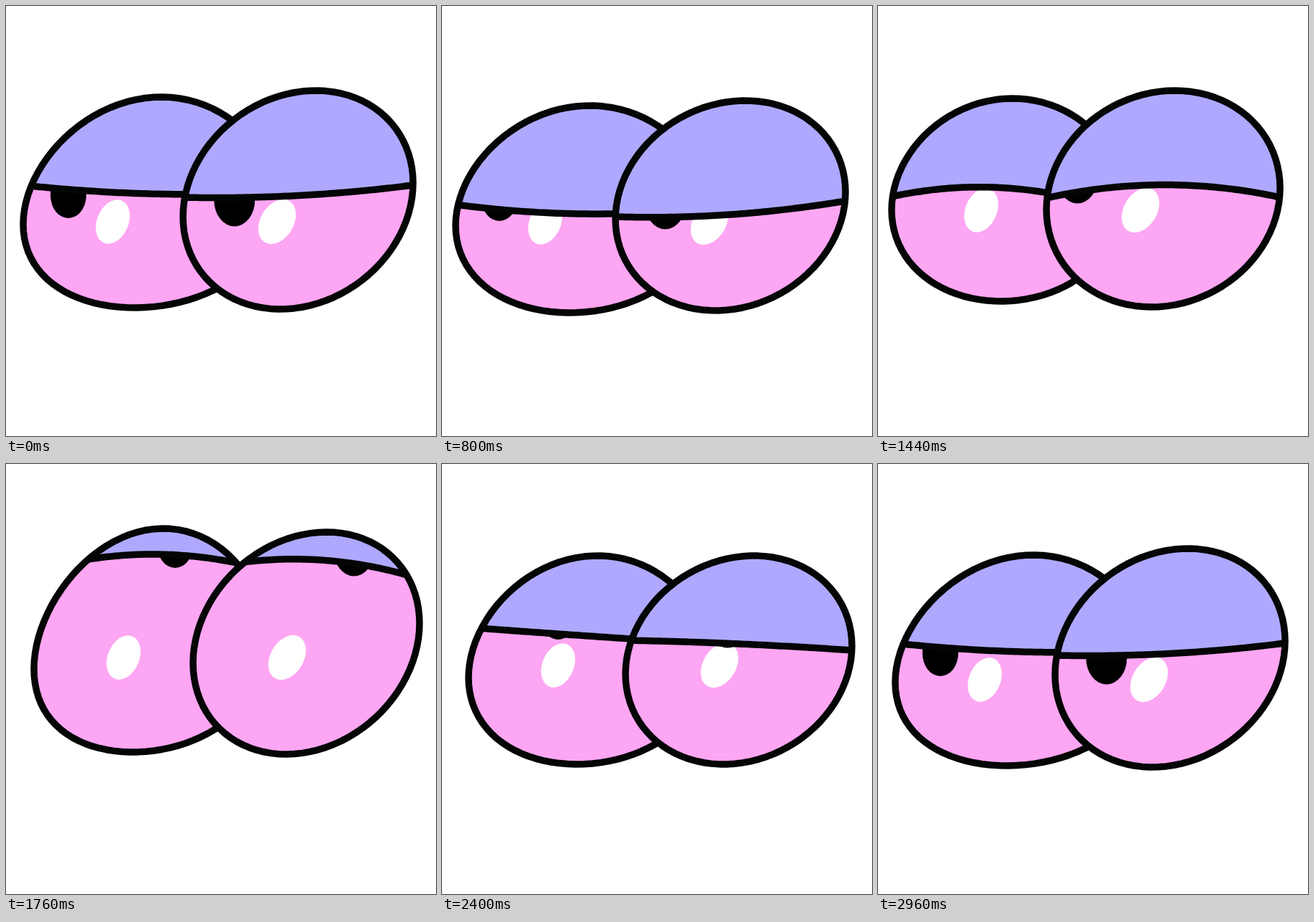
An HTML page with a canvas that plays this animation: 600 by 600 pixels, repeating every 3120 ms.

```html
<!DOCTYPE html>
<html lang="en">
<head>
<meta charset="utf-8">
<title>Sleepy eyes</title>
<style>
  html, body { margin: 0; width: 100%; height: 100%; overflow: hidden; background: #fff; }
  canvas { display: block; width: 100vw; height: 100vh; }
</style>
</head>
<body>
<canvas id="stage" width="600" height="600"></canvas>
<script>
const ctx = document.getElementById('stage').getContext('2d');
const INK = '#040505', LID = '#aea9ff', EYE = '#fda6f3';
const LOOP = 3120, STEP = 80;

// How the two eyes differ; span is the part of the lid line drawn when shut
const sides = [
  { tilt: 0, taper: 1, pupil: 1, shine: 1, drop: 0, turn: 0.4, span: [0.08, 1.05] },
  { tilt: 0.05, taper: 0, pupil: 1.14, shine: 1.05, drop: 7, turn: 0.54, span: [-0.18, 0.89] }
];

// pupil: x from the eye's left edge, y; shine: y;
// box: left, top, right, bottom; lid: y at left edge, middle and right edge
const pose = (lean, pupil, shine, box, lid, box2, lid2) =>
  [{ lean: [lean], pupil, shine: [shine], box, lid },
   { lean: [lean], pupil, shine: [shine], box: box2, lid: lid2 }];

const rest = pose(0.105, [63, 264], 301,
  [24, 127, 376, 421], [250, 262, 260], [247, 118, 568, 423], [267, 264.5, 250]);
const drowsy = pose(0.08, [61, 268], 302,
  [19, 139, 368, 428], [277, 290, 282], [242, 132, 563, 425], [294, 291, 272]);
const shut = pose(0.04, [52, 295], 305,
  [13, 168, 349, 418], [367, 382.5, 361], [227, 160, 565, 424], [374, 387, 357]);
const waking = pose(0.05, [38, 232], 285,
  [19, 129, 341, 412], [266, 254, 288], [235, 118, 561, 420], [268, 249.5, 267]);
const wide = pose(0.13, [197, 113], 270,
  [39, 90, 363, 402], [150, 126, 148], [261, 95, 577, 405], [150, 133, 160]);
const sinking = pose(0.085, [125, 213], 281,
  [37, 128, 371, 419], [228, 240, 251], [256, 128, 572, 419], [246, 251, 260]);

// time, pose, ease-out power of the way in
const keys = [
  [0, rest, 1], [800, drowsy, 1.3], [1200, shut, 1], [1440, waking, 1],
  [1760, wide, 1.5], [1840, wide, 1], [2400, sinking, 1], [2960, rest, 2], [LOOP, rest, 1]
];
// slots where the previous drawing is held
const held = [160, 400, 640, 880, 1280, 2000, 3040];

const mix = (a, b, u) => a.map((v, i) => v + (b[i] - v) * u);
const mixEye = (a, b, u) =>
  Object.fromEntries(Object.keys(a).map(k => [k, mix(a[k], b[k], u)]));

function trace(point, from, to, path = new Path2D()) {
  for (let i = 0; i <= 90; i++) path.lineTo(...point(from + (to - from) * i / 90));
  return path;
}

function oval(x, y, rx, ry, turn, color) {
  ctx.fillStyle = color;
  ctx.beginPath();
  ctx.ellipse(x, y, rx, ry, turn, 0, 2 * Math.PI);
  ctx.fill();
}

function drawEye(e, side, closed) {
  const [left, top, right, bottom] = e.box;
  const w = (right - left) / 2, h = (bottom - top) / 2;

  // Leaning ellipse; a tapered one leans only towards its left end
  const rim = a => {
    const lean = (e.lean[0] + side.tilt) * (1 - side.taper * Math.cos(a));
    return [left + w + w * Math.cos(a), top + h + h * Math.sin(a - lean)];
  };
  const shell = trace(rim, 0, 2 * Math.PI);
  shell.closePath();

  // Parabola through the three lid heights
  const [y0, y1, y2] = e.lid;
  const lidAt = t => [
    left + 2 * w * t,
    y0 + (y2 - y0) * t + (y1 - (y0 + y2) / 2) * 4 * t * (1 - t)
  ];

  ctx.fillStyle = closed ? LID : EYE;
  ctx.fill(shell);
  if (closed) {
    ctx.stroke(trace(lidAt, ...side.span));
  } else {
    const lid = trace(lidAt, -0.1, 1.1);
    const cover = new Path2D(lid);
    cover.lineTo(right + w, 0);
    cover.lineTo(left - w, 0);
    const p = side.pupil, s = side.shine;
    ctx.save();
    ctx.clip(shell);
    oval(left + 125 * s, e.shine[0], 22 * s, 32 * s, side.turn, '#fff');
    oval(left + e.pupil[0] * p, e.pupil[1] + side.drop, 25 * p, 32 * p, 0, '#000');
    ctx.fillStyle = LID;
    ctx.fill(cover);
    ctx.stroke(lid);
    ctx.restore();
  }
  ctx.stroke(shell);
}

// Sideways swing after the eyes open wide
function swing(t) {
  const v = (t - 1760) / 640;
  return v > 0 && v < 1 ? 19 * Math.sqrt(v) * (1 - v) : 0;
}

function draw(time) {
  let t = Math.floor(time % LOOP / STEP) * STEP;
  if (held.includes(t)) t -= STEP;
  const i = keys.findIndex(k => k[0] > t);
  const [t0, from] = keys[i - 1];
  const [t1, to, power] = keys[i];
  const u = 1 - (1 - (t - t0) / (t1 - t0)) ** power;
  const closed = from === shut && u === 0;

  ctx.setTransform(1, 0, 0, 1, 0, 0);
  ctx.fillStyle = '#fff';
  ctx.fillRect(0, 0, 600, 600);
  ctx.translate(swing(t), 0);
  ctx.strokeStyle = INK;
  ctx.lineWidth = 9.5;
  ctx.lineCap = ctx.lineJoin = 'round';
  const eyes = from.map((e, n) => mixEye(e, to[n], u));
  eyes.forEach((e, n) => drawEye(e, sides[n], closed));
  if (closed) {
    // the left lid line crosses over the right eye
    const [left, , right] = eyes[0].box;
    const [y0, y1, y2] = eyes[0].lid;
    ctx.stroke(trace(x => {
      const t = (x - left) / (right - left);
      return [x, y0 + (y2 - y0) * t + (y1 - (y0 + y2) / 2) * 4 * t * (1 - t)];
    }, 255, 367));
  }
}

const start = performance.now();
function tick() {
  draw(performance.now() - start);
  requestAnimationFrame(tick);
}
tick();
</script>
</body>
</html>
```
